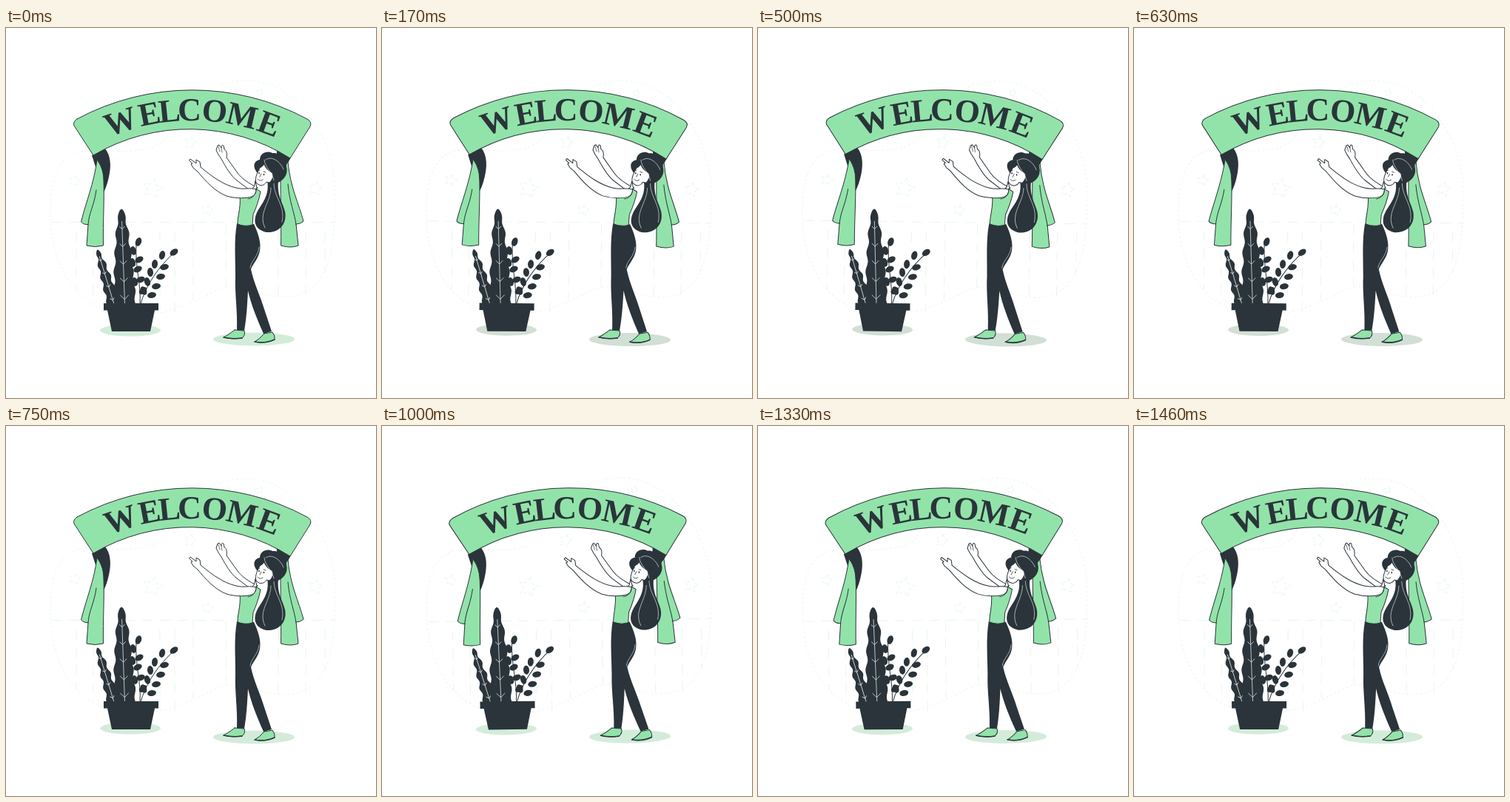
Recreate the animation shown at these times as an HTML page with a canvas. Size 500 px wide and 500 px high, loop 1.5 s.

```html
<!DOCTYPE html>
<html lang="en">
<head>
<meta charset="utf-8">
<title>Welcome</title>
<style>
html, body { margin: 0; width: 100%; height: 100%; overflow: hidden; background: #fff; }
canvas { display: block; width: 500px; height: 500px; }
</style>
</head>
<body>
<canvas id="stage" width="500" height="500"></canvas>
<script>
const ctx = document.getElementById('stage').getContext('2d');
const LOOP = 1500;
const GREEN = '#92e3a9', DARK = '#2a343a', WHITE = '#fff', FAINT = '#e6f8eb', VEIN = '#dfe4e3';

function shape(d, fill, stroke, width = 1) {
  const path = new Path2D(d);
  if (fill) {
    ctx.fillStyle = fill;
    ctx.fill(path);
  }
  if (stroke) {
    ctx.strokeStyle = stroke;
    ctx.lineWidth = width;
    ctx.stroke(path);
  }
}

function oval(x, y, rx, ry, fill, turn = 0) {
  ctx.fillStyle = fill;
  ctx.beginPath();
  ctx.ellipse(x, y, rx, ry, turn * Math.PI / 180, 0, Math.PI * 2);
  ctx.fill();
}

function star(x, y, r) {
  ctx.beginPath();
  for (let i = 0; i < 10; i++) {
    const a = i * Math.PI / 5 - 1.35, d = i % 2 ? r * 0.48 : r;
    ctx.lineTo(x + d * Math.cos(a), y + d * Math.sin(a));
  }
  ctx.closePath();
  ctx.stroke();
}

function backdrop() {
  ctx.setLineDash([2, 4]);
  shape('M60 250C60 200 72 166 112 165C150 166 195 172 215 150C240 108 270 71 325 71' +
    'C395 72 445 150 445 225C445 300 436 362 378 363C340 363 330 345 297 350' +
    'C265 360 215 400 145 385C85 370 60 310 60 250Z', null, FAINT);
  ctx.setLineDash([5, 3]);
  [[93, 207, 8], [198, 217, 14], [249, 155, 9], [272, 246, 8], [418, 217, 10], [343, 87, 5]]
    .forEach(s => star(...s));
  ctx.setLineDash([14, 10]);
  shape('M95 275V355M118 275V372M208 275V372M228 275V385M253 262V368M297 265V350' +
    'M368 275V362M405 275V360M431 275V330M62 262.5H105M160 262.5H310M390 262.5H445', null, FAINT);
  ctx.setLineDash([]);
}

// Leaf with rippled edges, a midrib and V-shaped veins.
function rippledLeaf(x, y, length, width, turn, waves, veins) {
  ctx.save();
  ctx.translate(x, y);
  ctx.rotate(turn * Math.PI / 180);
  ctx.fillStyle = DARK;
  ctx.beginPath();
  for (const side of [-1, 1]) {
    for (let i = 0; i <= 80; i++) {
      const t = side < 0 ? i / 80 : 1 - i / 80;
      const half = width * Math.pow(t, 0.45) + Math.min(t * 9, 1.3) * Math.sin(t * waves * Math.PI * 2);
      ctx.lineTo(side * half, t * length);
    }
  }
  ctx.fill();
  ctx.strokeStyle = VEIN;
  ctx.lineWidth = 0.8;
  ctx.beginPath();
  ctx.moveTo(0, length * 0.13);
  ctx.lineTo(0, length);
  for (let i = 0; i < veins; i++) {
    const v = length * (0.21 + 0.73 * i / (veins - 1)), s = width * (0.22 + 0.18 * i / veins);
    ctx.moveTo(-s, v - s);
    ctx.lineTo(0, v);
    ctx.lineTo(s, v - s);
  }
  ctx.stroke();
  ctx.restore();
}

function plant() {
  shape('M181 373C183 345 174 325 176 291M182 373C188 350 205 323 229 302', null, DARK);
  [
    [179, 289, 20], [180, 313, 60], [172, 301, -15], [178, 326, 65], [171, 317, -15],
    [182, 340, 70], [185, 355, 50], [174, 343, -15],
    [227, 303, 55], [211, 307, 15], [214, 323, 75], [201, 319, 5], [209, 336, 80],
    [195, 330, -5], [203, 349, 80], [191, 343, -15], [197, 361, 80], [186, 355, -25]
  ].forEach(([x, y, turn]) => oval(x, y, 4, 6, DARK, turn));
  rippledLeaf(123.5, 299.5, 76, 8.5, -17, 4.5, 4);
  rippledLeaf(156, 244.5, 130, 15, -2, 5, 5);
  shape('M132 372H206V381.5H201L195 410H143L137 381.5H132Z', DARK);
}

function drapes() {
  shape('M116 172L134 163C141 172 142 184 140 196C138 208 135 216 132 222Z', DARK);
  shape('M123 178C119 210 108 235 101.500 262Q105 266 111 265.500L109 294Q120 297 131.500 294' +
    'C131 262 133 232 132 207C132 193 128 185 123 178Z', GREEN, DARK);
  shape('M122 219C119 241 112 249 111 266', null, DARK);
  shape('M366 164L385 175L372 198C368 190 365 178 366 164Z', DARK);
  shape('M381 181C384 215 396 238 402 261Q398 265 392 265L395 294Q385 298 371.500 294' +
    'C372 264 371 235 371 198Q374 189 381 181Z', GREEN, DARK);
  shape('M381 211C383 235 390 250 392 266', null, DARK);
}

// Letters stand on an arc, each at its own horizontal centre.
function lettering() {
  const centres = [154.5, 193.5, 220.5, 248, 282, 319.5, 356];
  const cx = 251, cy = 412, baseline = 287, middle = 302;
  ctx.fillStyle = DARK;
  ctx.font = 'bold 44px "Liberation Serif", "Times New Roman", serif';
  ctx.textAlign = 'center';
  [...'WELCOME'].forEach((letter, i) => {
    ctx.save();
    ctx.translate(cx, cy);
    ctx.rotate(Math.asin((centres[i] - cx) / middle));
    ctx.fillText(letter, 0, -baseline);
    ctx.restore();
  });
}

function banner() {
  drapes();
  shape('M96 123A328 328 0 0 1 407 123Q414 127 411 133L384 176A256 256 0 0 0 118 172' +
    'L92 132Q90 127 96 123Z', GREEN, DARK);
  lettering();
}

function legs() {
  shape('M312 264L335 265C341 278 345 290 343 301C341 312 334 318 331 326C335 345 343 360 349 380' +
    'L359 410L348 413C339 393 331 373 327 355C326 375 325 392 322 409L312 408' +
    'C313 380 309 360 310 335C310 310 308 287 312 264Z', DARK);
  shape('M342 296C341 309 331 314 330 324', null, '#cfd6d5', 0.7);
  shape('M309 408L322 409Q324 415 319 419Q305 421 294 418Q300 415 309 408Z', GREEN, DARK);
  shape('M349 413L360 411Q364 416 363 421Q350 427 336 424Q342 421 349 413Z', GREEN, DARK);
  shape('M294 418Q306 421 319 419M336 424Q350 427 363 421', null, DARK, 1.6);
}

function head() {
  shape('M353 206C356 222 350 232 342 244C333 258 334 272 352 276C371 277 380 263 377 248' +
    'C374 235 366 228 368 206Z', DARK);
  shape('M362 210C362 229 378 240 373 262M358 216C358 236 340 250 350 270', null, VEIN, 0.7);
  shape('M337 192C333 184 337 179 343 178C343 169 353 165 360 169C371 168 380 178 379 188' +
    'C382 198 374 208 364 210L346 206Z', DARK);
  shape('M343 189C339 196 335 206 339 210C344 215 350 212 352 208L356 209' +
    'C360 205 363 199 359 195C355 193 351 190 349 184Q346 188 343 189Z', WHITE, DARK);
  shape('M349 178C350 189 359 193 362 206M351 178C360 172 371 181 375 191', null, VEIN, 0.7);
  oval(342, 196, 0.8, 1.3, DARK);
  oval(348.5, 198, 0.8, 1.3, DARK);
  shape('M345 197L343 201M340 204Q343 208 347 205M340 193L343 192M348 194L351 195', null, DARK, 0.8);
}

function arms() {
  shape('M340 216C328 210 318 203 313 196L298 175C299 170 298 165 295 164L294 159' +
    'C292 157 291 159 291 162L288 158L286 159L285 162L284 165L287 171L291 177' +
    'C297 188 304 200 312 206L332 221Z', WHITE, DARK);
  shape('M287 160L289 167M291 162L292 168', null, DARK, 0.7);
  shape('M315 219L339 218L344 221C342 232 338 243 334 252L333 266Q323 269 313 265' +
    'C313 250 319 241 315 219Z', GREEN, DARK);
  shape('M337 207L339 216Q335 222 329 220L335 215Z', WHITE, DARK);
  shape('M338 218C329 215 322 219 311 216C294 212 280 202 263 188L262 181L257 178L257 183' +
    'L249 177L247.500 179L252 183L250 184L253 189L259 194C269 206 282 221 298 227' +
    'C311 231 326 230 332 228Q338 226 338 218Z', WHITE, DARK);
  shape('M327 231Q336 230 338 220', null, DARK, 0.8);
}

function woman() {
  legs();
  head();
  arms();
}

// Sway: out to +1° at a quarter, across to -1° at three quarters, back to rest.
function swayDegrees(time) {
  const p = (time % LOOP) / LOOP;
  if (p < 0.25) return p * 4;
  return p < 0.75 ? 2 - p * 4 : p * 4 - 4;
}

// Every group turns about its own centre.
function swayed(degrees, cx, cy, paint) {
  ctx.save();
  ctx.translate(cx, cy);
  ctx.rotate(degrees * Math.PI / 180);
  ctx.translate(-cx, -cy);
  paint();
  ctx.restore();
}

function draw(time) {
  const sway = swayDegrees(time);
  const shade = sway > 0.2 ? '#d1dfd5' : '#d3ecda';
  ctx.clearRect(0, 0, 500, 500);
  ctx.lineJoin = ctx.lineCap = 'round';
  swayed(sway, 252, 228, backdrop);
  swayed(sway, 258, 415, () => {
    oval(168, 408.5, 41, 8, shade);
    oval(335, 420.5, 55, 9, shade);
  });
  swayed(sway, 251, 190, banner);
  swayed(sway, 180, 328, plant);
  swayed(sway, 314, 292, woman);
}

let start;
function tick(now) {
  start ??= now;
  draw(now - start);
  requestAnimationFrame(tick);
}
draw(0);
requestAnimationFrame(tick);
</script>
</body>
</html>
```
